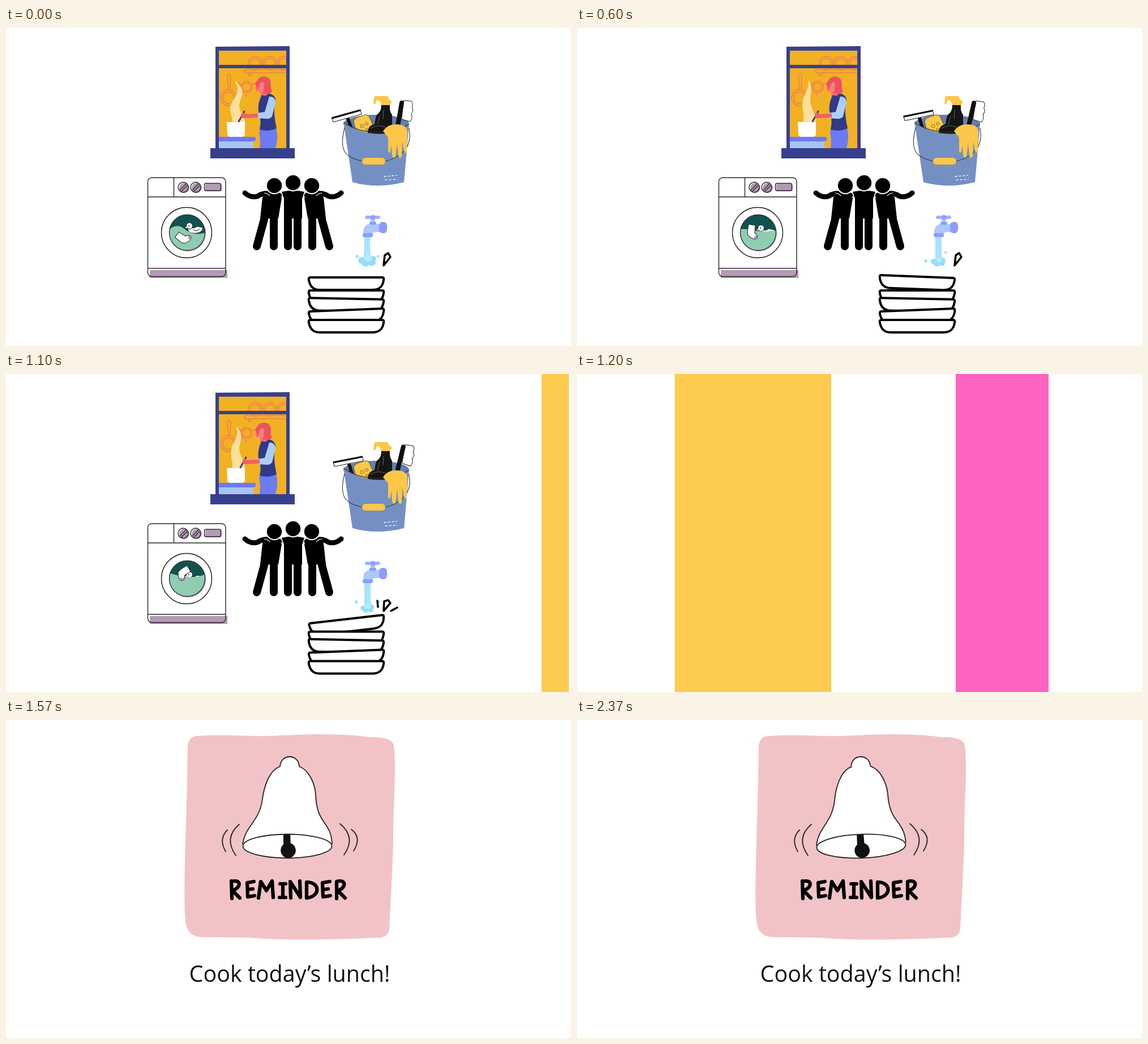
These frames come from a looping animation (998x561 px, 2510 ms). An HTML page:

```html
<!DOCTYPE html>
<html lang="en">
<head>
<meta charset="utf-8">
<title>Household reminder</title>
<style>
html, body { margin: 0; width: 100%; height: 100%; overflow: hidden; background: #fff; }
svg { display: block; width: 998px; height: 561px; }
.line { fill: none; stroke-linecap: round; stroke-linejoin: round; }
</style>
</head>
<body>
<svg viewBox="0 0 998 561">
<defs>
  <clipPath id="pane"><path d="M376 40H495V65H376ZM376 71H495V212H376Z"/></clipPath>
  <clipPath id="drum"><circle cx="320" cy="361" r="31.5"/></clipPath>
  <clipPath id="reveal"><rect id="edge" width="998" height="561"/></clipPath>
  <path id="plate" d="M537 0H665Q668 0 667 5C665 18 658 22 647 22H554C543 22 537 16 535 5Q534 0 537 0Z"/>
  <g id="friend">
    <path class="line" stroke="#000" stroke-width="9" d="M422 291Q432 300 444 297Q453 291 464 292"/>
    <path d="M453 299Q456 290 468 290H481Q489 290 487 300L481 336H449Z"/>
    <path class="line" stroke="#000" stroke-width="14" d="M457 334L443 385M473 334V385"/>
    <circle cx="474" cy="278" r="14.2" stroke="#fff" stroke-width="2"/>
  </g>
</defs>

<g id="home">
  <!-- kitchen window -->
  <path fill="#37408e" d="M370 33L501 32V212H510V230H361V212H370Z"/>
  <g clip-path="url(#pane)">
    <rect x="376" y="38" width="119" height="176" fill="#f2b122"/>
    <g class="line" stroke="#ee7d54" stroke-width="1.6">
      <circle cx="440" cy="62" r="12"/><circle cx="440" cy="62" r="8.5"/>
      <circle cx="466" cy="62" r="12"/><circle cx="466" cy="62" r="8.5"/>
      <circle cx="491" cy="62" r="12"/><circle cx="491" cy="62" r="8.5"/>
      <path d="M498 73H424Q419 76 423 79H498M428 79V83Q431 86 433 82V79"/>
      <path d="M393 109L391 84Q394 78 397 84L396 109M415 100L411 97M435 100L439 98M424 117V121"/>
      <circle cx="393" cy="123" r="14"/><circle cx="393" cy="123" r="10"/>
      <circle cx="425" cy="104" r="10"/><circle cx="425" cy="104" r="7"/>
    </g>
    <path id="steam" fill="#fbdf9a"/>
    <path fill="#a8c4f5" d="M376 198H437V212H376Z"/>
    <path fill="#6a7bf4" d="M376 192H438Q442 192 441 197Q440 200 436 200H376Z"/>
    <path fill="#fff" d="M390 166H422V187Q422 192 416 192H396Q391 192 391 187Z"/>
    <path fill="#6a7bf4" d="M449 177H477Q482 191 476 212H448Q450 198 447 184Z"/>
    <path fill="#f1726f" d="M450 106H464V122H449Z"/>
    <path fill="#30398a" d="M452 118Q460 122 463 115Q475 117 476 127Q471 146 478 177Q463 184 448 179Q452 162 446 149Q444 132 452 118Z"/>
    <path fill="#ed5260" d="M443 95Q447 84 458 86Q468 87 468 100Q467 108 470 112Q464 119 454 115L442 103Z"/>
    <path fill="#f57e7c" d="M442 97Q452 94 456 97L455 111Q450 117 446 112L440 107Z"/>
    <path fill="#ed5260" d="M440 98Q443 91 451 94L446 106L442 115Q445 108 440 98Z"/>
    <path fill="#abcff4" d="M465 121Q475 120 476 131L470 156Q466 161 459 160L444 159V150L457 148Z"/>
    <g id="hand">
      <path class="line" stroke="#30398a" stroke-width="2.7" d="M421 147L411 165"/>
      <path fill="#ee6265" d="M445 151V158L422 159Q413 160 415 153L418 149Q424 152 428 152Z"/>
    </g>
  </g>

  <!-- cleaning bucket -->
  <ellipse cx="654" cy="169" rx="58" ry="16" fill="#657fb0"/>
  <g id="squeegee">
    <path class="line" stroke="#111" stroke-width="6" d="M603 158L613 185"/>
    <path d="M575 158L626 144L628 152L578 166Z" fill="#fff" stroke="#111"/>
    <path stroke="#111" stroke-width="3" d="M576 159L626 145"/>
  </g>
  <path fill="#fcc748" stroke="#222" stroke-width=".7" d="M614 166Q614 158 629 155Q637 150 642 157L656 188H620Z"/>
  <g fill="none" stroke="#8b6b20"><circle cx="629" cy="173" r="3"/><circle cx="637" cy="169" r="2.5"/><circle cx="637" cy="179" r="2"/></g>
  <path fill="#fcc748" d="M650 123Q651 119 657 120H674Q676 126 682 130L678 136H663Q662 128 655 127L652 135L649 134Z"/>
  <path fill="#151515" d="M663 136H678Q677 147 682 153V188H651Q650 163 655 153Q663 148 663 136Z"/>
  <g id="brush">
    <path fill="#fff" stroke="#222" d="M702 128L716 129Q720 133 717 140Q721 146 716 151Q719 158 714 165L699 161Z"/>
    <path class="line" stroke="#111" stroke-width="8" d="M699 132L692 172"/>
  </g>
  <path fill="#7490c2" d="M596 165Q620 185 655 186Q696 186 712 170L703 272Q655 284 612 272Z"/>
  <path fill="#151515" d="M639 185Q639 170 655 169Q667 168 674 186Q655 188 639 185Z"/>
  <path class="line" stroke="#666" d="M644 177Q657 169 670 175M667 145L666 160M660 156L656 170"/>
  <path class="line" stroke="#333" stroke-width="1.1" d="M598 176C588 216 598 229 631 235H670C702 227 718 207 712 177M597 167Q620 183 655 184Q690 184 711 170"/>
  <path fill="#fcc748" d="M666 182Q674 169 691 170Q710 171 709 185L708 217Q705 224 703 216L700 200L699 226Q696 233 693 225L691 204L688 227Q684 232 682 224L681 206L679 218Q675 224 675 213V193Z"/>
  <rect x="629" y="229" width="41" height="12" rx="6" fill="#fcc748"/>
  <path class="line" stroke="#fff" stroke-width="1.3" stroke-dasharray="3 4" d="M668 262L690 260M670 268L691 267"/>

  <!-- washing machine -->
  <path fill="#b39bb7" d="M254 427H391V441H254Z"/>
  <g fill="#b39bb7"><circle cx="315" cy="282" r="9"/><circle cx="337" cy="282" r="9"/><rect x="352" y="275" width="29" height="13" rx="3"/></g>
  <g fill="none" stroke="#282426" stroke-width="1.4">
    <rect x="250.5" y="264" width="137.5" height="174.5" rx="7"/>
    <path d="M251 298H388M296.5 264V298M251 424H388M307 286L318 275M310 288L320 278M329 286L340 275M332 288L342 278"/>
    <circle cx="313" cy="281" r="9"/><circle cx="335" cy="281" r="9"/><rect x="350.5" y="274" width="29" height="13" rx="3"/>
    <circle cx="319" cy="361" r="44.5"/>
  </g>
  <circle cx="321" cy="362" r="32" fill="#b39bb7"/>
  <g clip-path="url(#drum)">
    <rect x="285" y="325" width="70" height="75" fill="#10524f"/>
    <g id="duck" stroke="#222">
      <path fill="#fff" d="M325 351Q333 355 337 350L348 352Q347 361 336 362Q322 363 321 355Z"/>
      <circle cx="324" cy="349" r="5.5" fill="#fff"/>
      <path fill="#fff" d="M319 350L314 352L320 354"/><circle cx="323" cy="349" r=".7"/>
      <path fill="none" d="M330 355Q336 361 342 354"/>
    </g>
    <path id="water" fill="#8fcdb2"/>
    <g id="sock" stroke="#222">
      <path fill="#fff" d="M-6-13L6-12L6 1Q14 5 10 11Q4 14-5 7Q-8 4-6-13Z"/>
      <path fill="#b39bb7" stroke="none" d="M4 12Q13 12 10 4Q6 6 4 12Z"/>
    </g>
  </g>
  <circle cx="320" cy="361" r="31.5" fill="none" stroke="#333" stroke-width="1.4"/>

  <!-- friends -->
  <use href="#friend"/>
  <use href="#friend" transform="matrix(-1 0 0 1 1014 0)"/>
  <path d="M487 289Q507 284 527 289L523 301V336H491V301Z"/>
  <path class="line" stroke="#000" stroke-width="14" d="M498 330V385M515 330V385"/>
  <path class="line" stroke="#fff" stroke-width="1.2" d="M486 298Q491 301 490 306L488 336M528 298Q523 301 524 306L526 336M456 291Q463 292 466 296M558 291Q551 292 548 296"/>
  <circle cx="507" cy="273" r="14.2" stroke="#fff" stroke-width="2"/>

  <!-- tap -->
  <path id="stream" fill="#a9e4fc"/>
  <g id="splash" fill="#96def8">
    <circle cx="-10" cy="0" r="6"/><circle cx="-3" cy="4" r="7"/><circle cx="8" cy="3" r="7"/><circle cx="11" cy="-3" r="5"/><circle cx="2" cy="-4" r="6" fill="#b9ebff"/>
  </g>
  <g fill="#a9e4fc"><circle id="dropL" r="3"/><circle id="dropR" r="2.5"/></g>
  <path fill="#abc8fc" d="M644 335H652V346H665V360H653Q647 360 646 367H631V358Q632 347 644 345Z"/>
  <g fill="#8f9cf9"><rect x="630" y="362" width="18" height="7" rx="3"/><rect x="659" y="342" width="14" height="20" rx="6"/><rect x="642" y="342" width="12" height="5" rx="2"/></g>
  <path class="line" stroke="#9fb4fb" stroke-width="6" d="M637 334H658"/><circle cx="648" cy="334" r="4" fill="#8f9cf9"/>

  <!-- plates -->
  <g id="plates" fill="#fff" stroke="#000" stroke-width="4"></g>
  <path id="spark" class="line" stroke="#000" stroke-width="3.5"/>
</g>

<g id="bands"></g>

<g clip-path="url(#reveal)">
  <rect width="998" height="561" fill="#fff"/>
  <path fill="#f2c3c6" d="M321 45Q323 28 340 28C400 24 430 31 490 27C550 24 610 25 640 30Q684 29 685 46C690 80 684 150 684 200S679 320 677 368Q675 385 655 384C570 388 480 389 430 384L345 383Q320 382 317 355C312 300 319 200 321 45Z"/>
  <g id="bell" stroke="#222" stroke-width="1.8" fill="#fff">
    <path d="M484 82C485 59 517 59 518 82C537 89 546 115 547 132C549 186 574 177 576 218L574 229H420L418 218C424 180 449 183 454 132C459 107 469 87 484 82Z" stroke="none"/>
    <path fill="none" d="M418 219C424 182 449 182 454 132C459 107 469 87 484 82C485 59 517 59 518 82C537 89 546 115 547 132C549 186 574 177 576 219"/>
    <ellipse cx="497" cy="222.5" rx="78.5" ry="21"/>
    <g fill="#111" stroke="none"><path d="M490 202H502L503 222H490Z"/><circle cx="498.5" cy="230" r="13.3"/></g>
  </g>
  <g class="line" stroke="#222" stroke-width="1.8">
    <path id="ringL" d="M391 194Q375 210 388 232M412 184Q384 208 406 239"/>
    <path id="ringR" d="M590 183Q619 207 597 238M610 193Q629 207 614 231"/>
  </g>
  <path class="line" role="img" aria-label="REMINDER" stroke="#000" stroke-width="6.2" d="M398 284L399 315M398 285C415 280 417 295 400 301L413 314M438 285L426 287L427 312L439 310M427 299L436 298M446 314L450 285L460 301L470 284L472 313M484 289H494M489 289V312M483 313H494M503 314L502 285L520 313L519 284M531 286V314C555 312 556 286 531 286M572 285L559 287L560 312L573 310M560 299L569 298M584 315V285C601 280 602 296 586 301L599 314"/>
  <text x="501" y="462" text-anchor="middle" font-family="'Open Sans', 'Noto Sans', sans-serif" font-size="39.4" fill="#111">Cook today’s lunch!</text>
</g>
</svg>
<script>
const LOOP = 2510;
const $ = id => document.getElementById(id);
const set = (el, attrs) => { for (const k in attrs) el.setAttribute(k, attrs[k]); };
const add = (parent, tag, attrs) => {
  const el = document.createElementNS('http://www.w3.org/2000/svg', tag);
  set(el, attrs);
  return parent.appendChild(el);
};

const bands = ['#fdcb50', '#fff', '#ff63c1', '#fff'].map(fill =>
  add($('bands'), 'rect', { width: 1000, height: 561, fill }));
const plates = [0, 1, 2, 3, 4].map(() => add($('plates'), 'use', { href: '#plate' }));

// value at 0, 600 and 1100 ms
const mix = (t, a, b, c) => t < 600
  ? a + (b - a) * t / 600
  : b + (c - b) * Math.min(1, (t - 600) / 500);

// each sweep edge speeds up from right to left
const sweep = (t, lag) => Math.max(0, 998 - .0463 * Math.max(0, t - 1066.5 - lag) ** 2);

function steamPath(t) {
  const left = [], right = [];
  for (let y = 92; y <= 168; y += 4) {
    const u = (y - 92) / 76;
    const x = 407 + 2 * u + mix(t, 7, 4, 5) * (1 - u * .6) * Math.sin((y - 92) / 9.5 + mix(t, -.5, .5, 0));
    const w = 11.5 * Math.pow(u, .75);
    left.push(`${x - w},${y}`);
    right.unshift(`${x + w},${y}`);
  }
  return `M${left.join('L')}L${right.join('L')}Z`;
}

function drawHome(t) {
  set($('steam'), { d: steamPath(t) });
  set($('hand'), { transform: `translate(${mix(t, 0, 5, 3)} 0)` });
  set($('squeegee'), { transform: `translate(${mix(t, 0, 1, 2)} 0) rotate(${mix(t, 0, 4, 4.5)} 614 165)` });
  set($('brush'), { transform: `translate(0 ${mix(t, 0, 0, -4)}) rotate(${mix(t, 0, 3, 4)} 692 172)` });

  const a = (135 + t * .083) * Math.PI / 180;
  set($('sock'), { transform: `translate(${323 + 15 * Math.cos(a)} ${361 + 15 * Math.sin(a)}) rotate(${t * .1 - 55})` });
  set($('duck'), { transform: `translate(${mix(t, 0, 1, 0)} ${mix(t, 0, 4, 5)})` });
  set($('water'), { d: `M288 ${mix(t, 356, 355, 351)}Q303 ${mix(t, 342, 354, 356)} 318 ${mix(t, 357, 358, 358)}Q335 ${mix(t, 367, 360, 360)} 353 ${mix(t, 361, 357, 353)}V400H285Z` });

  const wob = 1.5 * Math.sin(t / 80);
  set($('stream'), { d: `M632 367H644Q${642 + wob} 388 645 409H${631 + wob}Q634 386 632 367Z` });
  set($('splash'), { transform: `translate(638 ${mix(t, 410, 412, 413)}) scale(${mix(t, 1, .8, .75)})` });
  set($('dropL'), { cx: mix(t, 620, 616, 619), cy: mix(t, 403, 411, 402) });
  set($('dropR'), { cx: mix(t, 657, 651, 658), cy: mix(t, 403, 396, 402) });

  const lift = t < 850 ? 0 : -8.5;
  const tops = [mix(t, 440, 438.5, 441), 463, 477.5, 497.5, 515];
  const tilts = [mix(t, 0, 2.2, -6.5), 0, 1.2, -2.3, 0];
  plates.forEach((p, i) => set(p, {
    transform: `translate(0 ${tops[i] + lift}) rotate(${tilts[i]} 601 0)`
  }));
  set($('spark'), { d: t < 850
    ? 'M667 419L669 401L675 397L679 404Z'
    : 'M656 400L657 411M667 418L668 401L675 399L679 404ZM680 418L691 412' });
}

function drawBell(t) {
  const left = t >= 1570 && t < 1770 || t >= 1970 && t < 2170;
  const shift = left ? 0 : 2;
  set($('bell'), { transform: `rotate(${left ? 0 : -1.9} 501 75)` });
  set($('ringL'), { transform: `translate(${shift} 0)` });
  set($('ringR'), { transform: `translate(${-shift} 0)` });
}

function draw(t) {
  const step = Math.floor((t + 4) * .03) * 100 / 3; // thirty pictures a second
  drawHome(Math.min(step, 1100));
  bands.forEach((b, i) => set(b, { x: sweep(step, 24.6 * i) }));
  set($('edge'), { x: sweep(step, 130) });
  drawBell(t);
}

const start = performance.now();
function tick() {
  draw((performance.now() - start) % LOOP);
  requestAnimationFrame(tick);
}
tick();
</script>
</body>
</html>
```
